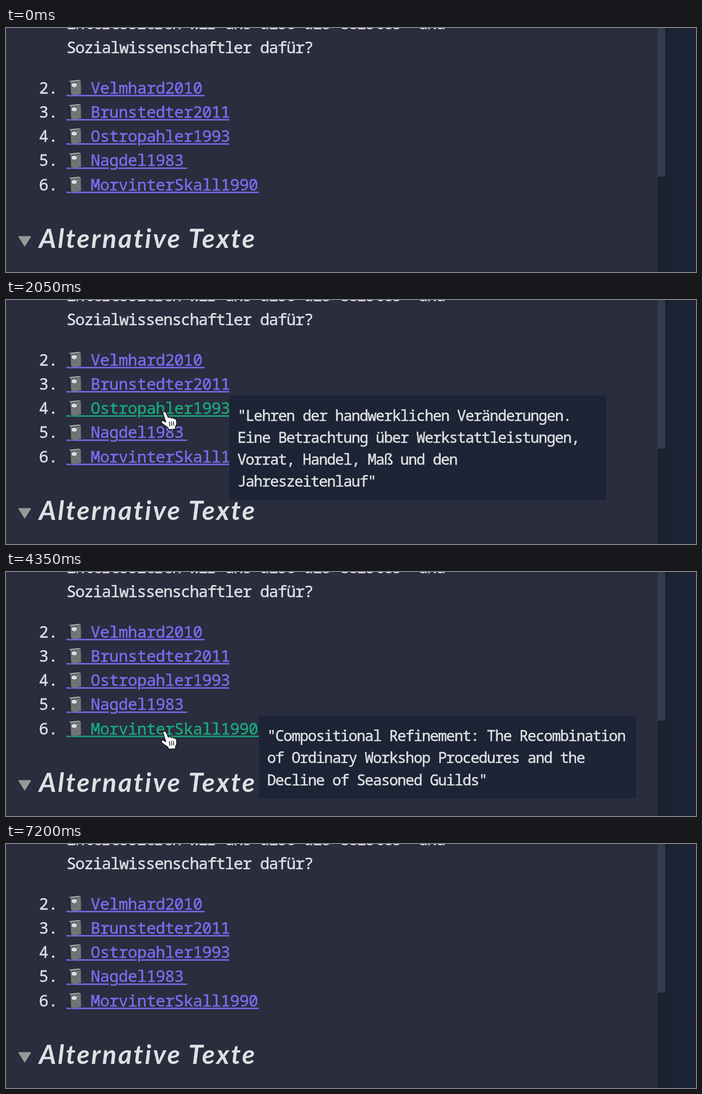
An HTML page that plays this animation: 1255 px wide and 446 px high, repeating every 7.25 s.

```html
<!DOCTYPE html>
<html lang="de">
<head>
<meta charset="utf-8">
<title>Literaturliste</title>
<style>
  html, body { margin: 0; width: 100%; height: 100%; overflow: hidden; background: #292d3e; }
  svg { display: block; width: 1255px; height: 446px; color: #dfe0e2; }
  text {
    font: 29px "Noto Sans Mono", monospace; white-space: pre;
    fill: currentColor; stroke: currentColor; stroke-width: .5;
  }
  .body { letter-spacing: -1.4px; }
  .link text { letter-spacing: -.5px; }
  .name { color: #7c6cef; }
  .hover .name { color: #18a97c; }
  .name path { stroke: currentColor; stroke-width: 2.5; }
  .tip rect { fill: #1c2435; }
  .tip text { font-size: 27px; letter-spacing: -1.4px; }
  .head { font: italic 700 48px Lato, sans-serif; letter-spacing: 3px; stroke: none; }
</style>
</head>
<body>
<svg viewBox="0 0 1255 446">
  <defs>
    <g id="book">
      <path d="M114 97 133 95 137 97 118 99Z" fill="#d4d4d2"/>
      <path d="M114 97 118 99 118.500 124 115 121Z" fill="#25272a"/>
      <path d="M117 98 136 96 137 121 118.500 124Z" fill="#64676a"/>
      <g id="specks" fill="#b0b2b2"></g>
      <ellipse cx="124" cy="104.500" rx="4.500" ry="3.200" fill="#f0f0ee"/>
      <path d="M121.500 104.500H126.500" stroke="#888" stroke-width=".8"/>
    </g>
    <linearGradient id="side">
      <stop offset="0" stop-color="#192231"/>
      <stop offset=".2" stop-color="#1b2335"/>
      <stop offset="1" stop-color="#1d2438"/>
    </linearGradient>
  </defs>
  <rect width="1255" height="446" fill="#292d3e"/>
  <rect x="1185" width="14" height="446" fill="#1a2330"/>
  <rect x="1185" width="14" height="271.500" fill="#343b50"/>
  <rect x="1199" width="56" height="446" fill="url(#side)"/>
  <text class="body" x="110" y="2">interessieren wir uns also als Geistes- und</text>
  <text class="body" x="110" y="46">Sozialwissenschaftler dafür?</text>
  <path d="M23.500 381.500H44.500L34 398Z" fill="#999" stroke="#999" stroke-width="2" stroke-linejoin="round"/>
  <text class="head" x="60" y="401.500">Alternative Texte</text>
  <g id="under"></g>
  <g id="links"></g>
  <g id="over"></g>
  <g id="hand" stroke="#111" stroke-width="1.500" stroke-linejoin="round" stroke-linecap="round">
    <g transform="translate(-3 0) scale(.92 1)">
      <path fill="#fff" d="M-2 1C-1-2 3-2 5 2L9 10C11 8 14 9 15 11 17 9 20 10 20 12 22 11 24 12 25 15 26 20 26 23 23 27V31L10 32 8 28C4 26-1 22-4 20-6 17-3 14 0 16L4 18Z"/>
      <path d="M11 18 12 25M15 17.500 16 24.500M19 17 20 24"/>
    </g>
  </g>
</svg>
<script>
const LOOP = 7250, PITCH = 44.25, ADVANCE = 16.9;
const $ = id => document.getElementById(id);

// name, right edge of the link, tooltip width, tooltip lines
const entries = [
  ["Velmhard2010", 361, 524, ['"Die Werkstätten der Wandelbaren"']],
  ["Brunstedter2011", 406, 410, ['"The Tinkerer\'s Quandary"']],
  ["Ostropahler1993", 406, 686, ['"Lehren der handwerklichen Veränderungen.',
    "Eine Betrachtung über Werkstattleistungen,", "Vorrat, Handel, Maß und den", 'Jahreszeitenlauf"']],
  ["Nagdel1983", 329.5, 394, ['"Currents of Inventions"']],
  ["MorvinterSkall1990", 460, 686, ['"Compositional Refinement: The Recombination',
    "of Ordinary Workshop Procedures and the", 'Decline of Seasoned Guilds"']],
];

// fingertip: time, x, y
const path = [
  [0, 330, -60], [50, 330, -50], [450, 312, 106], [800, 310, 108], [1150, 305, 160],
  [1650, 305, 160], [2000, 290, 205], [2400, 288, 205], [2700, 283, 220], [3000, 282, 244],
  [3150, 282, 246], [3500, 280, 254], [3650, 280, 254], [3950, 288, 290], [4350, 290, 292],
  [5050, 290, 292], [5150, 288, 284], [5450, 287, 282], [5700, 276, 249], [5950, 276, 249],
  [6080, 277, 205], [6200, 278, 190], [6350, 280, 158], [6650, 282, 150], [6700, 282, 150],
  [7200, 295, -50], [7250, 295, -60],
];

const ramp = (t, from, to) => Math.min(1, Math.max(0, (t - from) / (to - from)));

function tipAt(t) {
  const i = path.findIndex(p => p[0] > t);
  const [t0, x0, y0] = path[i - 1], [t1, x1, y1] = path[i];
  const u = ramp(t, t0, t1), s = u * u * (3 - 2 * u);
  return [x0 + (x1 - x0) * s, y0 + (y1 - y0) * s];
}

const rowAt = t => Math.floor((tipAt(t)[1] - 88) / 44.2);

// Underline that leaves a gap at descenders
function underline(name, right) {
  const gaps = [...name].map((c, i) => /[gp]/.test(c)
    ? `H${153 + i * ADVANCE}m${c === "g" ? 17 : 8} 0` : "").join("");
  return `M110 123.5${gaps}H${right}`;
}

for (let i = 0; i < 70; i++) {
  const x = 118.5 + (i * 7.31) % 17, y = 99 + (i * 5.77) % 22;
  $("specks").innerHTML += `<rect x="${x}" y="${y}" width="1" height="1"/>`;
}

entries.forEach(([name, right, width, lines], r) => {
  const place = `transform="translate(0 ${r * PITCH})"`;
  $("links").innerHTML += `<g class="link" ${place}><text x="60" y="119.5">${r + 2}.</text>
    <g class="name"><path d="${underline(name, right)}"/><text x="154" y="119.5">${name}</text></g>
    <use href="#book"/></g>`;
  $("under").innerHTML += `<g class="tip" ${place}>
    <rect x="${right}" y="86" width="${width}" height="${30 + 40.2 * lines.length}"/><g>` +
    lines.map((s, i) => `<text x="${right + 15}" y="${132 + 40.3 * i}">${s}</text>`).join("") + "</g></g>";
});

const links = [...document.querySelectorAll(".link")];
const tips = [...document.querySelectorAll(".tip")];

const visits = [];
for (let t = 0, last = -1; t < LOOP; t += 2) {
  const row = rowAt(t);
  if (row !== last && visits.length) visits.at(-1).end ??= t;
  if (row !== last && entries[row]) visits.push({ row, start: t });
  last = row;
}

const light = [223, 224, 226], ghost = [38, 43, 59];

function draw(now) {
  const t = now % LOOP;
  const [x, y] = tipAt(t);
  $("hand").setAttribute("transform", `translate(${x} ${y})`);
  tips.forEach((tip, r) => {
    const v = visits.filter(v => v.row === r && v.start <= t).at(-1);
    const active = !!v && t < v.end;
    links[r].classList.toggle("hover", active);
    const layer = active ? $("over") : $("under");
    if (tip.parentNode !== layer) layer.append(tip);
    tip.style.display = v ? "" : "none";
    if (!v) return;
    // Text reacts at once, the box follows
    const shown = Math.min(t, v.end) - v.start, gone = t - v.end;
    const stay = 1 - ramp(gone, 120, 250), dim = ramp(gone, 0, 80);
    const [box, words] = tip.children;
    box.style.opacity = ramp(shown, 120, 220) * stay;
    words.style.opacity = ramp(shown, 0, 80) * stay;
    words.style.color = `rgb(${light.map((c, i) => c + (ghost[i] - c) * dim)})`;
  });
}

const begin = performance.now();
function frame() {
  draw(performance.now() - begin);
  requestAnimationFrame(frame);
}
frame();
</script>
</body>
</html>
```
